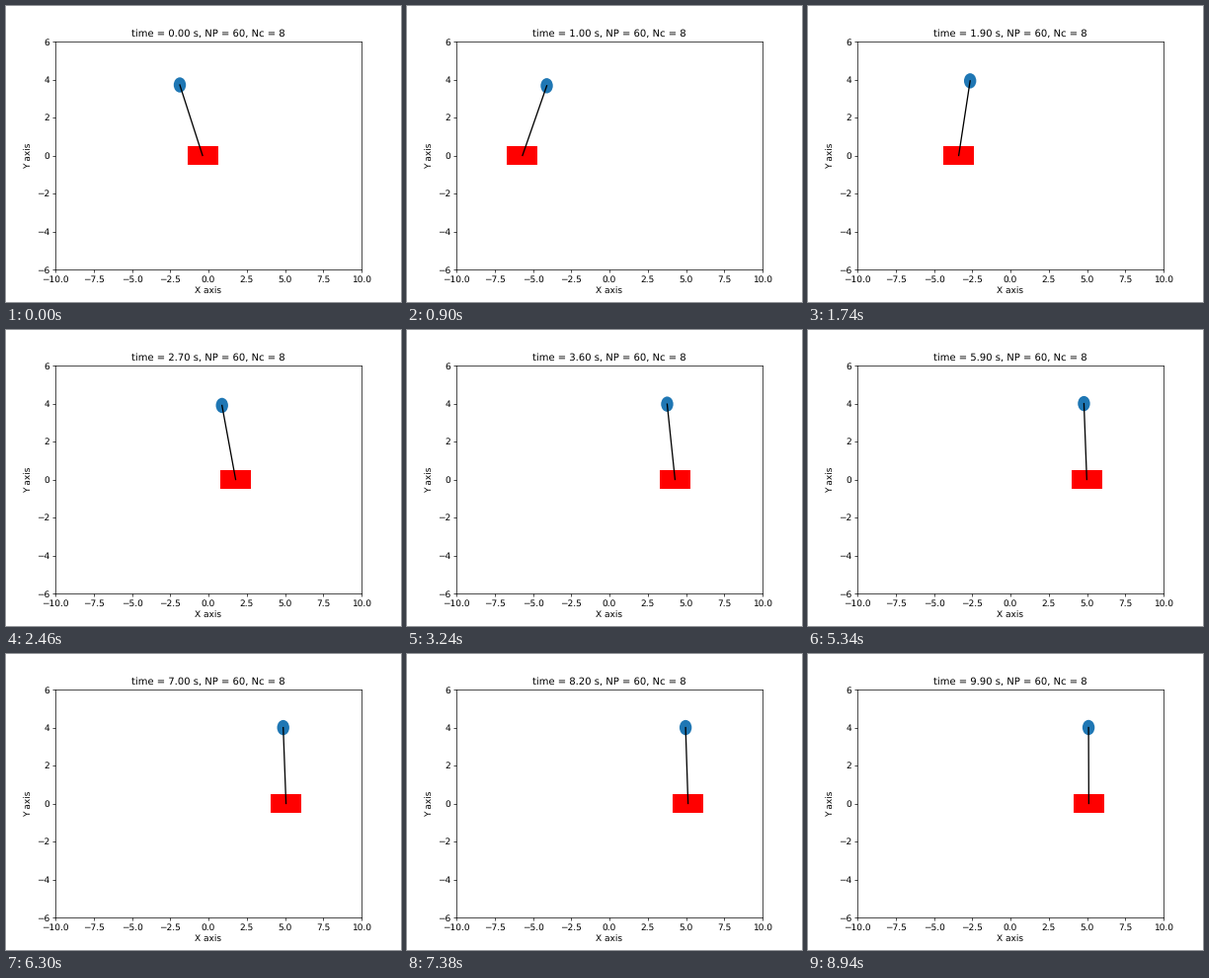
A matplotlib script for the animation above (9 s loop, 400 by 300 pixels).

```python
import numpy as np
import matplotlib.pyplot as plt
from matplotlib.animation import FuncAnimation
from matplotlib.patches import Circle, Rectangle

plt.rcParams["text.hinting"] = "none"
plt.rcParams["text.hinting_factor"] = 1

TICK_MS = 60
TICKS = 150
DT = 0.1
POLE = 4.0
CART_W, CART_H = 2.0, 1.0


def bob_x(t):
    """Drop to the left, then a run up to a slowly drifting rest point."""
    rest = 4.36 + 0.075 * t
    return rest - (6.23 + 3.15 * t) * np.exp(-0.095 * t ** 2.7)


def lean(t):
    """Tilt to the left in radians: a dying swing over a small offset."""
    swing = 0.505 * (1 + 0.27 * t) * np.exp(-0.169 * t ** 2)
    offset = 0.047 * (1 - (t / 10) ** 10)
    return offset - swing * np.sin(1.717 * (t - 0.42))


fig, ax = plt.subplots(figsize=(6.4, 4.8), dpi=62.5)
ax.set(xlim=(-10, 10), ylim=(-6, 6))
ax.set_xlabel("X axis", labelpad=3)
ax.set_ylabel("Y axis")
ax.set_xticks(np.arange(-10, 10.1, 2.5))
ax.set_yticks(range(-6, 7, 2))
title = ax.set_title("")

cart = ax.add_patch(Rectangle((0, -CART_H / 2), CART_W, CART_H,
                              fc="red", lw=0))
bob = ax.add_patch(Circle((0, POLE), 0.4, fc="tab:blue", lw=0))
rod, = ax.plot([], [], color="black", lw=1.5)


def update(tick):
    # Steps are held alternately for two ticks and one tick.
    step = 2 * (tick // 3) + (tick % 3 == 2)
    t = step * DT
    angle = lean(t)
    bx, by = bob_x(t), POLE * np.cos(angle)
    cx = bx + POLE * np.sin(angle)
    cart.set_x(cx - CART_W / 2)
    bob.center = bx, by
    rod.set_data([cx, bx], [0, by])
    title.set_text(f"time = {t:.2f} s, NP = 60, Nc = 8")
    return cart, bob, rod, title


anim = FuncAnimation(fig, update, frames=TICKS, interval=TICK_MS,
                     repeat=True, repeat_delay=0, blit=False)
plt.show()
```
